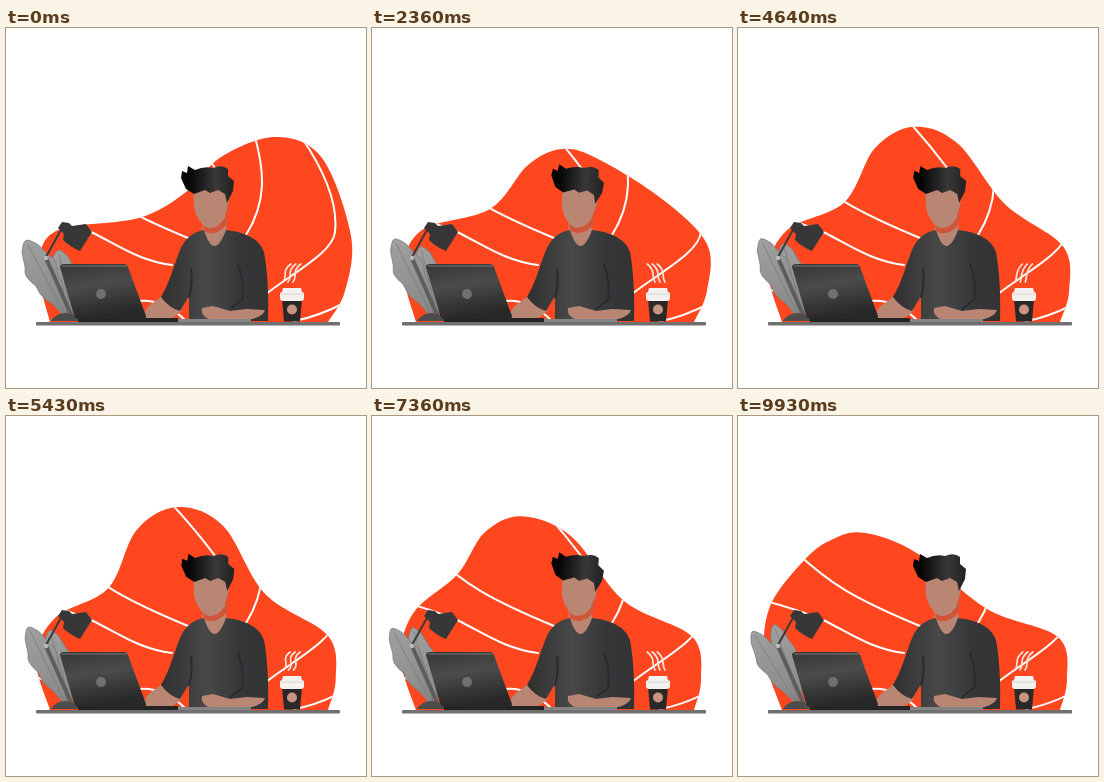
An HTML page for the animation above (10 s loop, 360x360 px).

```html
<!DOCTYPE html>
<html lang="en">
<head>
<meta charset="utf-8">
<title>Working at a desk</title>
<style>
  html, body { margin: 0; width: 100%; height: 100%; overflow: hidden; background: #fff; }
  svg { display: block; width: 100vw; height: 100vh; }
  .lines, .steam { fill: none; stroke: #fff; stroke-width: 2; stroke-linecap: round; }
  .steam { stroke: #f4e4df; stroke-width: 1.7; }
  .leaf { fill: url(#leaf); stroke: #7d7d7d; stroke-width: .8; }
  .skin { fill: #b98674; }
</style>
</head>
<body>
<svg viewBox="0 0 360 360">
  <defs>
    <clipPath id="clip"><path id="blob"/></clipPath>
    <linearGradient id="shirt">
      <stop offset="0" stop-color="#303030"/><stop offset=".42" stop-color="#484848"/>
      <stop offset=".75" stop-color="#353638"/><stop offset="1" stop-color="#333"/>
    </linearGradient>
    <linearGradient id="hair">
      <stop offset=".15" stop-color="#050505"/><stop offset=".65" stop-color="#383838"/>
      <stop offset="1" stop-color="#222"/>
    </linearGradient>
    <linearGradient id="lid" x1="0" y1="0" x2=".25" y2="1">
      <stop offset="0" stop-color="#363636"/><stop offset=".45" stop-color="#4b4b4b"/>
      <stop offset="1" stop-color="#282828"/>
    </linearGradient>
    <linearGradient id="leaf" x1="0" y1="0" x2="0" y2="1">
      <stop offset="0" stop-color="#a0a0a0"/><stop offset="1" stop-color="#858585"/>
    </linearGradient>
  </defs>

  <g clip-path="url(#clip)">
    <rect width="360" height="360" fill="#ff471f"/>
    <g class="lines">
      <path d="M24 184Q58 193 85 204C112 217 133 233 166 237"/>
      <path d="M58 136C92 168 117 183 182 210"/>
      <path d="M247 102C260 145 260 175 240 207"/>
      <path d="M160 82Q185 108 210 141"/>
      <path d="M296 110C321 147 332 178 329 204C327 224 290 243 260 266"/>
      <path d="M28 261Q40 263 50 268M132 273C152 271 167 280 181 294"/>
      <path d="M288 293C306 290 321 284 340 274"/>
    </g>
  </g>

  <path id="back" class="leaf"/>
  <path id="front" class="leaf"/>

  <path d="M40 230L67 291" stroke="#5d5d5d" stroke-width="4"/>
  <path d="M56 200L40 229" stroke="#3a3a3a" stroke-width="2"/>
  <circle cx="40" cy="230" r="2.2" fill="#bbb"/>
  <path d="M52 200L56 194L63 195L66 198L80 196L86 204L74 223Q64 219 57 212L58 206Z" fill="#373737"/>
  <path d="M45 293Q50 285 60 285Q70 286 74 293Z" fill="#4c4c4c"/>

  <path class="skin" d="M156 268L144 277Q136 284 139 290L158 292Q170 290 176 282Z"/>
  <path class="skin" d="M197 192L219 187L221 206Q210 232 196 206Z"/>
  <path d="M198 202C186 204 178 212 174 222C168 237 164 254 155 269Q163 280 174 283L183 268V293H262C263 265 261 240 258 224C253 210 238 204 220 202Q208 234 198 202Z" fill="url(#shirt)"/>
  <path d="M183 270Q187 255 185 240M232 236Q239 256 236 272L224 281" fill="none" stroke="#292b2f" stroke-width="2"/>
  <path class="skin" d="M196 280L207 278L224 283L240 281L259 282Q256 290 240 292H205Q194 288 196 280Z"/>

  <g id="head">
    <path d="M197 196Q207 205 219 190L223 174L221 196Q209 210 198 203Z" fill="#d2553a"/>
    <path class="skin" d="M187 160L188 180Q191 193 200 199Q207 202 214 196Q223 184 224 160L210 154Z"/>
    <path d="M175 150L176 143L181 145L182 138L189 142Q198 138 207 140Q216 136 222 141L222 148L228 153L227 163L221 175L219 166L212 162L204 165L199 162L188 166L180 161Z" fill="url(#hair)"/>
  </g>

  <rect x="30" y="294" width="304" height="3.4" rx="1" fill="#707070"/>
  <path d="M172 291H245V294H172Z" fill="#858585"/>
  <path d="M72 290H172V294H72Z" fill="#242424"/>
  <path d="M54 239Q54 236 58 236H118Q121 236 122 239L140 288Q140 291 137 291H73Q69 291 68 287Z" fill="url(#lid)"/>
  <path d="M56 238H121" stroke="#777"/>
  <circle cx="95" cy="266" r="5" fill="#707070"/>

  <path d="M276 271H296L294 293.5H278Z" fill="#2b2829"/>
  <path d="M277 260H295L296 264L298 265V270Q298 273 295 273H277Q274 273 274 270V265L276 264Z" fill="#f4f2f1"/>
  <path d="M275 266H297" stroke="#d5d0ce"/>
  <circle cx="286" cy="281.5" r="5" fill="#c79580"/>
  <path id="steam" class="steam"/>
</svg>
<script>
const LOOP = 10000, FPS = 14;
const $ = id => document.getElementById(id);
const mix = (a, b, u) => a + (b - a) * u;
const mixPoints = (p, q, u) => p.map((a, i) => a.map((v, k) => mix(v, q[i][k], u)));

// Top edge of the backdrop at four moments, left to right.
const hills = [
  { at: 0, top: [[50, 203], [133, 190], [180, 164], [215, 129], [270, 109], [316, 130], [345, 208]] },
  { at: 2360, top: [[50, 202], [118, 181], [156, 137], [190, 121], [226, 131], [290, 171], [335, 216]] },
  { at: 5850, top: [[50, 201], [100, 171], [127, 111], [169, 87], [216, 107], [255, 179], [320, 220]] },
  { at: LOOP, top: [[32, 190], [67, 143], [95, 123], [126, 117], [178, 137], [249, 193], [320, 221]] }
];

function outline(t) {
  const i = hills.findLastIndex((h, k) => h.at <= t && k < hills.length - 1);
  const a = hills[i], b = hills[i + 1];
  let u = (t - a.at) / (b.at - a.at);
  if (b.at === LOOP) u = 1 - (1 - u) ** 1.3;
  const right = mix(339, 329, Math.min(1, t / 5850));
  return [[44, 294], [mix(33, 27, t / LOOP), 242], ...mixPoints(a.top, b.top, u), [right, 263], [322, 294]];
}

// Smooth open curve through the points, closed by a straight line.
function smooth(pts) {
  const at = i => pts[Math.max(0, Math.min(pts.length - 1, i))];
  const handle = (p, from, to) => p.map((v, k) => v + (to[k] - from[k]) / 6);
  let d = 'M' + pts[0];
  for (let i = 0; i < pts.length - 1; i++)
    d += `C${handle(at(i), at(i - 1), at(i + 1))} ${handle(at(i + 1), at(i + 2), at(i))} ${at(i + 1)}`;
  return d + 'Z';
}

// Upright leaf with wavy edges and a midrib, growing from 0,0.
function leaf(length, width) {
  const edge = [];
  for (let i = -12; i <= 12; i++) {
    const s = 1 - Math.abs(i) / 12;
    const w = width * Math.sin(Math.PI * s ** 1.5) ** .75 * (1 + .1 * Math.sin(s * 22));
    edge.push([Math.sign(i) * w, -s * length]);
  }
  return smooth(edge) + `M0 0V${-length * .95}`;
}

function steamPath(t) {
  const sway = lag => 6 * Math.cos(t / 5000 * 2 * Math.PI - lag);
  return [280, 285, 290].map(x =>
    `M${x - sway(0) * .5} 254C${x + sway(1.2)} 248 ${x - sway(.6)} 243 ${x + sway(0) * .8} 236`
  ).join('');
}

const pose = (id, x, y, angle, sx = 1, sy = 1) =>
  $(id).setAttribute('transform', `translate(${x} ${y}) rotate(${angle}) scale(${sx} ${sy})`);

function draw(t) {
  const u = t / LOOP;
  $('blob').setAttribute('d', smooth(outline(t)));
  $('steam').setAttribute('d', steamPath(t));
  pose('front', 62, 292, -28 - 4 * u + 4 * Math.sin(Math.PI * u), mix(1, .8, u));
  pose('back', 66, 292, mix(-11, -20, u), mix(1, .85, u), mix(1, 1.25, u));
  const tilt = 2.3 * (1 - Math.cos(u * 4 * Math.PI));
  $('head').setAttribute('transform', `rotate(${tilt} 208 203)`);
}

$('front').setAttribute('d', leaf(90, 15));
$('back').setAttribute('d', leaf(71, 13));

const start = performance.now();
function tick(now) {
  const t = Math.max(0, now - start) % LOOP;
  draw(Math.floor(t * FPS / 1000 + .1) * 1000 / FPS % LOOP);
  requestAnimationFrame(tick);
}
draw(0);
requestAnimationFrame(tick);
</script>
</body>
</html>
```
